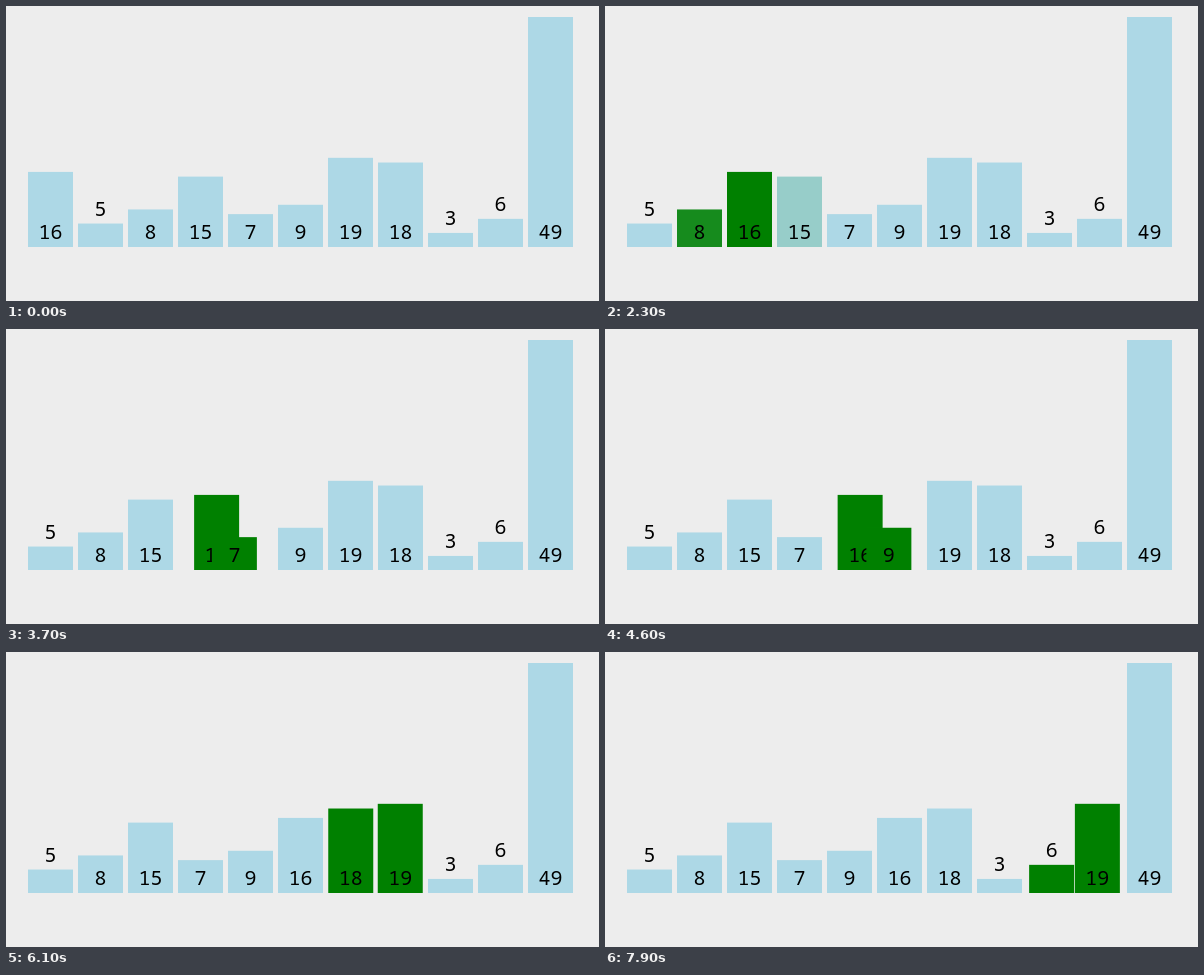
An HTML page for the animation above (8000 ms loop, 593 by 295 pixels).

```html
<!DOCTYPE html>
<html lang="en">
<head>
<meta charset="utf-8">
<title>Bubble sort</title>
<style>
  html, body { margin: 0; width: 100%; height: 100%; overflow: hidden; background: #ededed; }
  svg { display: block; width: 593px; height: 295px; }
  text { font: 20px "Noto Sans Mono", "DejaVu Sans Mono", monospace; text-anchor: middle; fill: #000; }
</style>
</head>
<body>
<svg id="chart" viewBox="0 0 593 295"></svg>
<script>
const values = [16, 5, 8, 15, 7, 9, 19, 18, 3, 6, 49];
const LOOP = 8000, TICK = 100;
const START = 393, STEP = 457, FADE = 250;
const LEFT = 22, PITCH = 50, WIDTH = 45, BASE = 241, SCALE = 230 / 49;
const BLUE = [173, 216, 230], GREEN = [0, 128, 0];

const chart = document.getElementById('chart');

function add(parent, tag, attrs) {
  const el = document.createElementNS('http://www.w3.org/2000/svg', tag);
  for (const name in attrs) el.setAttribute(name, attrs[name]);
  return parent.appendChild(el);
}

const bars = values.map(v => {
  const height = v * SCALE, top = BASE - height;
  const group = add(chart, 'g', {});
  const rect = add(group, 'rect', { y: top, width: WIDTH, height });
  const label = add(group, 'text', { x: WIDTH / 2, y: v < 7 ? top - 7.5 : 233 });
  label.textContent = v;
  return { group, rect };
});

// Each state holds every bar's slot and whether it is highlighted.
function sortStates() {
  const order = values.map((_, i) => i);
  const states = [];
  const save = pair => states.push(values.map((_, id) => ({
    slot: order.indexOf(id),
    lit: pair.includes(id) ? 1 : 0
  })));
  save([]);
  for (let i = 0; i < order.length - 1; i++) {
    const pair = [order[i], order[i + 1]];
    save(pair);
    if (values[pair[0]] > values[pair[1]]) {
      [order[i], order[i + 1]] = [pair[1], pair[0]];
      save(pair);
    }
  }
  return states;
}

const states = sortStates();
const mix = (a, b, p) => a + (b - a) * p;
const ease = p => p < 0.5 ? 4 * p ** 3 : 1 - 4 * (1 - p) ** 3;

function draw(time) {
  const t = Math.floor(time % LOOP / TICK) * TICK - START;
  const k = Math.max(0, Math.floor(t / STEP));
  const p = ease(Math.min(1, Math.max(0, (t - k * STEP) / FADE)));
  const from = states[k], to = states[k + 1];
  bars.forEach(({ group, rect }, id) => {
    const x = LEFT + PITCH * mix(from[id].slot, to[id].slot, p);
    const lit = mix(from[id].lit, to[id].lit, p);
    const color = BLUE.map((c, i) => Math.round(mix(c, GREEN[i], lit)));
    group.setAttribute('transform', `translate(${x} 0)`);
    rect.setAttribute('fill', `rgb(${color})`);
  });
}

const began = performance.now();
function frame() {
  draw(performance.now() - began);
  requestAnimationFrame(frame);
}
frame();
</script>
</body>
</html>
```
